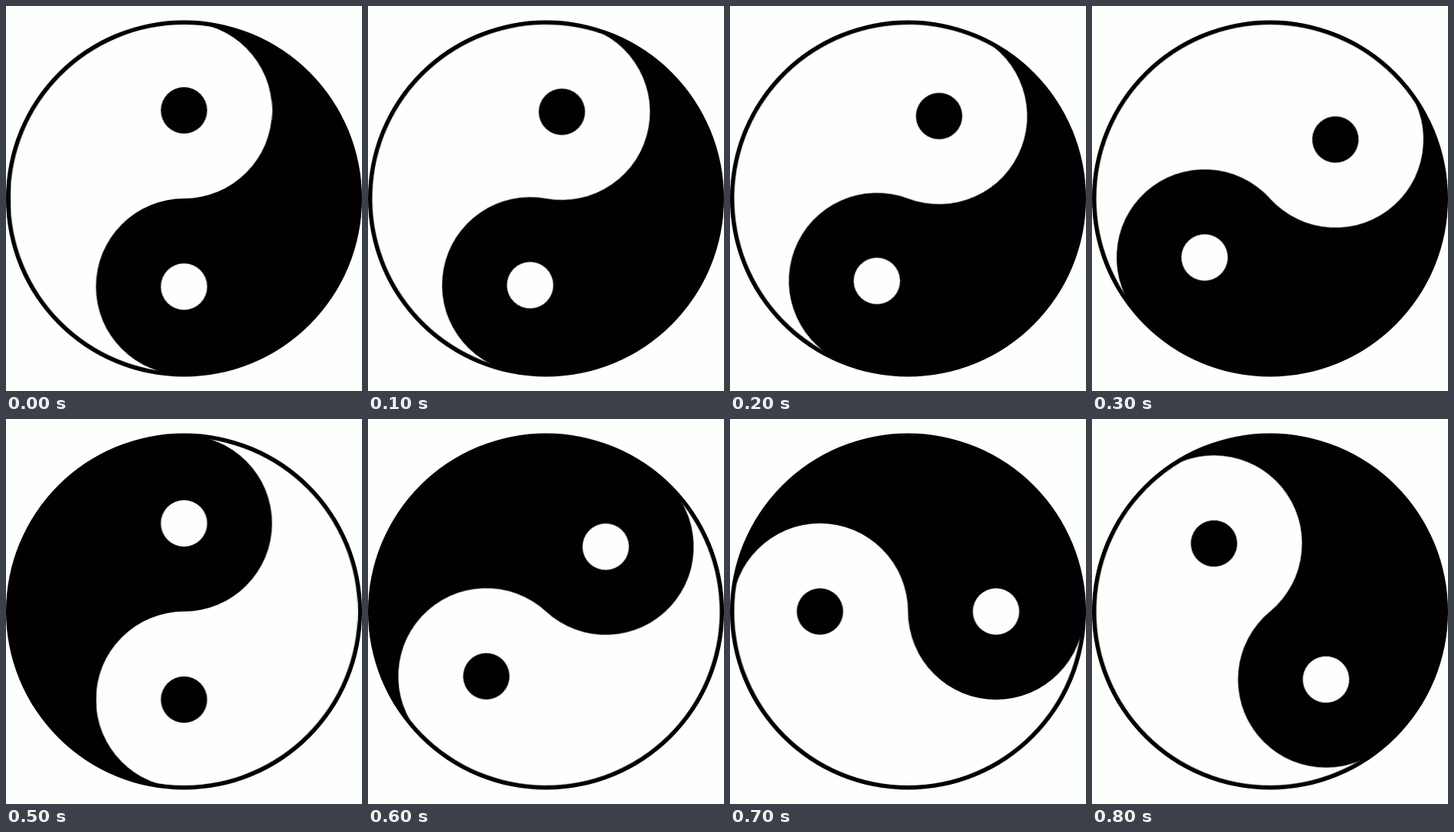
Animation, 461 px wide and 498 px high, one loop 0.9 s. Source, as an HTML page:

```html
<!DOCTYPE html>
<html lang="en">
<head>
<meta charset="utf-8">
<title>Yin and yang</title>
<style>
  html, body { margin: 0; width: 100%; height: 100%; overflow: hidden; background: #fdfffc; }
  svg { display: block; width: 100%; height: 100%; }
  .dark { fill: #020002; }
  .light { fill: #fdfffc; }
</style>
</head>
<body>
<svg viewBox="0 0 461 498">
  <clipPath id="inner"><circle r="225"/></clipPath>
  <g transform="translate(230.5 249)">
    <circle class="dark" r="230.5"/>
    <g id="symbol">
      <path class="light" clip-path="url(#inner)"
        d="M0 -228 A114 114 0 0 1 0 0 A114 114 0 0 0 0 228 A228 228 0 0 1 0 -228Z"/>
      <circle class="dark" cy="-114" r="30"/>
      <circle class="light" cy="114" r="30"/>
    </g>
  </g>
</svg>
<script>
  // Clockwise angle in degrees, held for one step each
  const angles = [0, 10.4, 20.7, 48, 90, 180, 222.7, 270, 320.5];
  const stepMs = 100;

  const keyframes = [...angles, 360].map((angle, i) => ({
    offset: i / angles.length,
    transform: `rotate(${angle}deg)`,
    easing: 'step-end'
  }));

  document.getElementById('symbol').animate(keyframes, {
    duration: angles.length * stepMs,
    iterations: Infinity
  });
</script>
</body>
</html>
```
